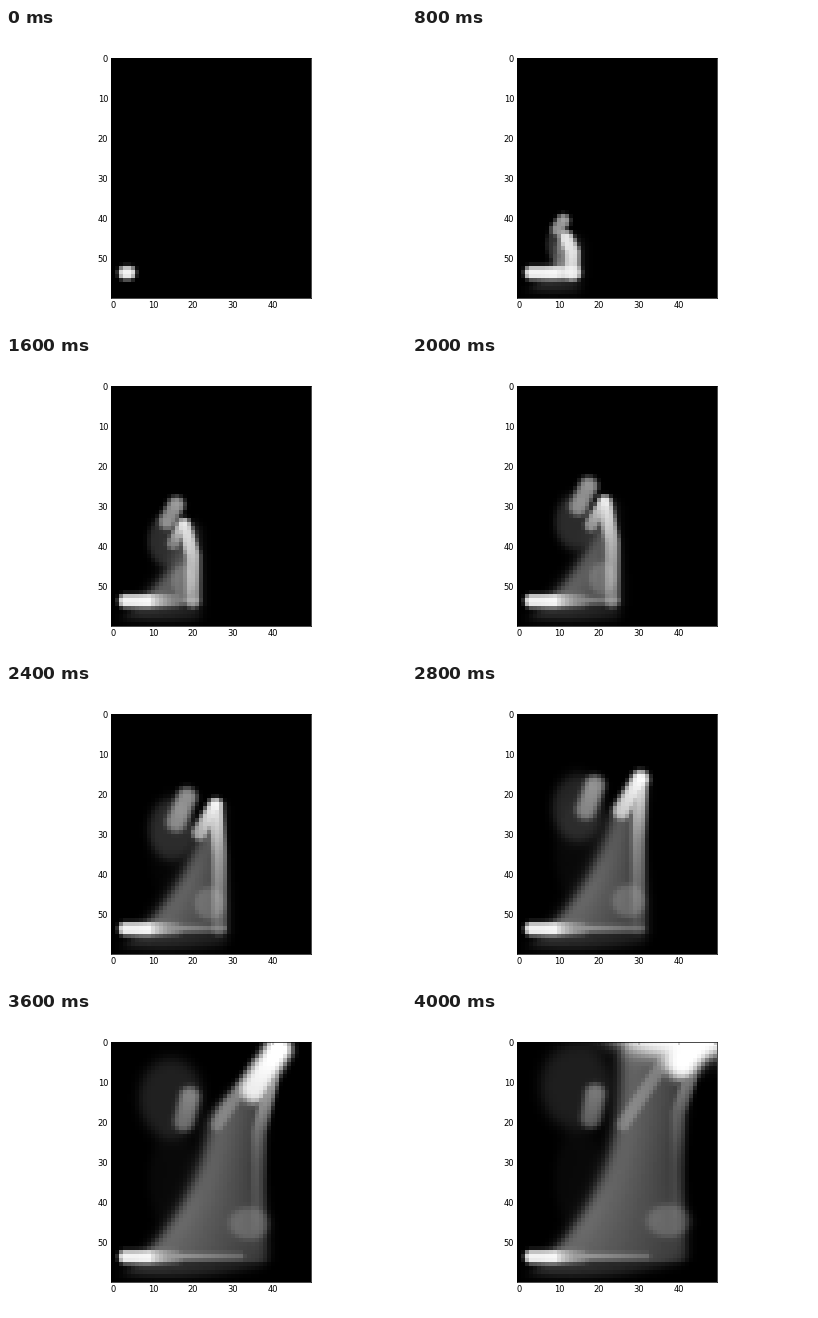
Animation of 400 by 300 pixels, one loop 4100 ms. Source, as a matplotlib script:

```python
import numpy as np
import matplotlib.pyplot as plt
from matplotlib.animation import FuncAnimation

plt.style.use("classic")
plt.rcParams.update({"savefig.dpi": "figure", "savefig.facecolor": "white",
                     "font.family": "DejaVu Sans"})

ROWS, COLS, FRAMES = 60, 50, 41
LAST = FRAMES - 1
GROUND = 53.2
Y, X = np.mgrid[0:ROWS, 0:COLS].astype(float)


def ramp(n, start, length):
    """Smooth rise from 0 to 1."""
    u = np.clip((n - start) / length, 0, 1)
    return u * u * (3 - 2 * u)


def soft(depth, width=0.7):
    """Soft edge: 1 well inside, 0 well outside."""
    return 1 / (1 + np.exp(-np.clip(depth / width, -40, 40)))


def oval(cx, cy, rx, ry):
    return soft(1 - np.hypot((X - cx) / rx, (Y - cy) / ry), 0.1)


def stroke(points, radius, weights):
    """Soft polyline whose brightness runs through the given weights."""
    out = np.zeros((ROWS, COLS))
    for (ax, ay), (bx, by), u, v in zip(points, points[1:], weights, weights[1:]):
        dx, dy = bx - ax, by - ay
        s = ((X - ax) * dx + (Y - ay) * dy) / max(dx * dx + dy * dy, 1e-9)
        s = np.clip(s, 0, 1)
        d = np.hypot(X - ax - s * dx, Y - ay - s * dy)
        out = np.maximum(out, (u + (v - u) * s) * np.exp(-(d / radius) ** 4))
    return out


def heel_edge(n):
    return 8.7 + 0.83 * n


def tip(n):
    """Upper end of the leg, rising ever faster to the right."""
    return 8 + 0.35 * n + 0.016 * n ** 2, 53 - 0.95 * n - 0.0135 * n ** 2


def foot(n):
    end = min(4 + 1.25 * n, 16)
    fade = np.exp(-np.maximum(X - 9, 0) / max(5, 30 - 2 * n))
    pad = stroke([(3, GROUND), (end, GROUND)], 1.75, (0.95, 0.95)) * fade
    sole_end = min(4 + 1.2 * n, heel_edge(n) - 1, 32)
    sole = stroke([(4, 53), (sole_end, 53)], 0.9, (0.45, 0.2))
    return np.maximum(pad, sole)


def leg(n):
    """Grey body between shin and calf, under the slanted top."""
    px, py = tip(n)
    shin = 25.5 - 18 * (Y / 53) ** 2.8
    calf = heel_edge(n) - n / 20 * np.exp(-((Y - 30) / 11) ** 2)
    top = py + np.maximum(px - X, 0) - 14 * ramp(n, 35, 5)
    sole = 58 - ((X - 15) / 14) ** 2
    across = np.clip((X - shin) / np.maximum(calf - shin, 1), 0, 1)
    shade = (0.44 - 0.22 * across) * np.where(Y > 54.5, 0.5, 1)
    return shade * soft(X - shin, 1) * soft(calf - X) * soft(Y - top) * soft(sole - Y)


def front(n):
    """Bright moving edge: a wedge at the tip and a ridge down the calf."""
    px, py = tip(n)
    back = heel_edge(n) - 2
    reach = n / 36
    wedge = stroke([(px, py), (px - 6 * reach, py + 10 * reach)],
                   1.6 + 2 * reach ** 4, (0.8 + 0.25 * reach, 0.9 * reach))
    ridge = stroke([(px, py), (back, 0.6 * py + 0.4 * GROUND), (back, GROUND)],
                   1.9, (0.9, 1 - n / 50, max(0, 1 - n / 30)))
    return np.maximum(wedge, ridge)


def knob(n):
    """Bright bar on the left that slows as it rises."""
    left = 1 - n / LAST
    cx, cy = 18.5 - 14.5 * left ** 2.6, 15.5 + 37.5 * left ** 1.7
    size = min(1, n / 24)
    dx, dy = size * (0.5 + 2 * left), 3 * size
    level = 0.65 - 0.25 * (n / LAST) ** 2
    bar = stroke([(cx - dx, cy + dy), (cx + dx, cy - dy)],
                 1.3 + 1.4 * size, (0.8 * level, level))
    width = 1 + 0.19 * n
    lobe = oval(cx - 0.11 * n, cy + 7 * np.sin(np.pi * n / 32), width, width + 2)
    return bar, (0.22 - 0.1 * n / LAST) * lobe


def density(n):
    grow = min(1, n / 4)
    bar, lobe = knob(n)
    rise = ramp(n, 35, 5)
    layers = [
        foot(n),
        grow * leg(n),
        grow * front(n),
        grow * bar,
        grow * lobe,
        0.035 * ramp(n, 20, 8) * oval(15, 34, 6, 13),
        0.2 * grow * oval(heel_edge(n) - 4.5, 51 - 0.17 * n, 1 + 0.11 * n, 4),
        0.25 * ramp(n, 32, 4) * stroke([(36, 5), (26, 20)], 1.8, (1, 1)),
        rise * oval(42, -7, 1 + 21 * rise, 1 + 9.5 * rise),
    ]
    dark = np.prod([1 - np.clip(layer, 0, 1) for layer in layers], axis=0)
    return 1 - dark


fig = plt.figure(figsize=(8, 6), dpi=50, facecolor="white")
ax = fig.add_subplot(111)
image = ax.imshow(density(0), cmap="gray", vmin=0, vmax=1,
                  interpolation="nearest")


def draw(n):
    image.set_data(density(n))
    return [image]


anim = FuncAnimation(fig, draw, frames=FRAMES, interval=100, repeat=True)
plt.show()
```
